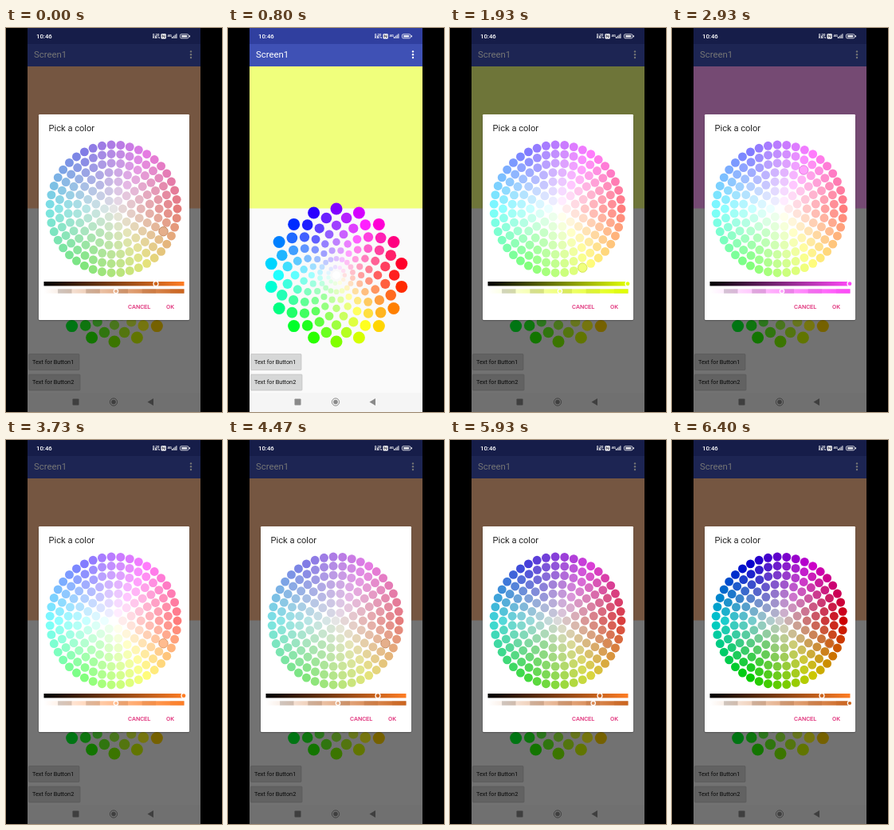
Animation, 271 px wide and 480 px high, one loop 6470 ms. Source, as an HTML page:

```html
<!DOCTYPE html>
<html lang="en">
<head>
<meta charset="utf-8">
<title>Pick a color</title>
<style>
  html, body { margin: 0; width: 100%; height: 100%; overflow: hidden; background: #000; }
  svg { display: block; width: 100vw; height: 100vh; font-family: Roboto, "Open Sans", sans-serif; }
</style>
</head>
<body>
<svg viewBox="0 0 271 480">
  <defs>
    <linearGradient id="valueFill"><stop stop-color="#000"/><stop id="valueEnd" offset="1"/></linearGradient>
    <linearGradient id="alphaFill"><stop id="alphaStart" stop-opacity="0"/><stop id="alphaEnd" offset="1"/></linearGradient>
    <clipPath id="phone"><rect x="27" width="217" height="480"/></clipPath>
  </defs>
  <rect width="271" height="480"/>
  <g clip-path="url(#phone)">
    <rect x="27" width="217" height="480" fill="#fafafa"/>
    <rect x="27" width="217" height="20" fill="#303f9f"/>
    <rect x="27" y="20" width="217" height="28" fill="#3f51b5"/>
    <text x="35" y="37.3" font-size="11.4" fill="#fff">Screen1</text>
    <g fill="#fff">
      <circle cx="232" cy="29.4" r="1.2"/><circle cx="232" cy="33.2" r="1.2"/><circle cx="232" cy="37" r="1.2"/>
    </g>
    <rect id="panel" x="27" y="48" width="217" height="177.5"/>
    <g id="flower"></g>
    <g fill="#d6d7d7" stroke="#bbb" stroke-width=".6">
      <rect x="28.5" y="407.5" width="63.5" height="20" rx="1"/>
      <rect x="28.5" y="433" width="64.5" height="20" rx="1"/>
    </g>
    <rect id="press" x="28.5" y="433" width="64.5" height="20" rx="1" fill="#555"/>
    <g font-size="7.3" fill="#111">
      <text x="33" y="419.7">Text for Button1</text>
      <text x="33" y="445.3">Text for Button2</text>
    </g>
    <rect x="27" y="456" width="217" height="24" fill="#f5f5f5"/>
    <g fill="#8a8a8a">
      <rect x="83.5" y="463.5" width="8" height="8" rx=".8"/>
      <circle cx="135" cy="467.5" r="4.6" fill="none" stroke="#8a8a8a"/>
      <circle cx="135" cy="467.5" r="2.8"/>
      <path d="M185 463v9l-7.5-4.5z"/>
    </g>
    <rect id="dim" x="27" width="217" height="480"/>
    <g fill="#fff">
      <text x="38" y="13" font-size="7.8" font-weight="500">10:46</text>
      <g font-size="4.2" font-weight="700">
        <text x="184" y="9.7">0.20</text><text x="184" y="13.4">KB/s</text>
        <text x="202.5" y="10.5">4G</text>
      </g>
      <rect x="194.5" y="7.2" width="6.3" height="6.3" rx="1"/>
      <path d="M196.3 12v-3.4l2.7 3.4v-3.4" fill="none" stroke="#223" stroke-width=".8"/>
      <path d="M208 13v-2h1v2zm1.8 0v-3.3h1V13zm1.8 0V8.6h1V13zm1.8 0V7.3h1V13z"/>
      <rect x="218.5" y="7.8" width="10.5" height="5" rx="1.4" fill="none" stroke="#fff" stroke-width=".8"/>
      <rect x="220.2" y="9.2" width="7" height="2.2"/><rect x="229.8" y="9.3" width="1.2" height="2"/>
    </g>
    <g id="dialog">
      <rect x="40.4" y="108.8" width="190" height="257.4" rx="2" opacity=".22"/>
      <rect x="41" y="108" width="189" height="257" rx="1.3" fill="#fff"/>
      <text x="53.5" y="129" font-size="11.1" fill="#222">Pick a color</text>
      <g id="wheel"></g>
      <circle id="mark" r="5.7" fill="none" stroke-width=".9"/>
      <rect x="47.5" y="317" width="176" height="5.4" fill="url(#valueFill)"/>
      <g id="checks"></g>
      <rect x="47.5" y="326.3" width="176" height="5.4" fill="url(#alphaFill)"/>
      <circle id="valueKnob" cy="319.7" r="3" stroke="#fff" stroke-width="1.2"/>
      <circle id="alphaKnob" cy="329" r="2.7" stroke="#fff" stroke-width="1.2"/>
      <g font-size="7.5" font-weight="500" fill="#e0307a">
        <text x="153" y="351.2">CANCEL</text><text x="201" y="351.2">OK</text>
      </g>
    </g>
  </g>
</svg>
<script>
const LOOP = 6470, HALF = 0.514, TAU = Math.PI * 2;
const $ = id => document.getElementById(id);
const ramp = (t, a, b) => Math.min(1, Math.max(0, (t - a) / (b - a)));
const mix = (a, b, p) => a + (b - a) * p;
const ease = p => p * p * (3 - 2 * p);

function set(el, attrs) {
  for (const key in attrs) el.setAttribute(key, attrs[key]);
  return el;
}

function add(parent, name, attrs) {
  const el = document.createElementNS("http://www.w3.org/2000/svg", name);
  parent.append(set(el, attrs));
  return el;
}

// HSV colour with alpha, flattened onto a grey level
function color(h, s, v, alpha = 1, ground = 255) {
  const channel = n => {
    const k = (n + h / 60) % 6;
    const c = 255 * v * (1 - s * Math.max(0, Math.min(k, 4 - k, 1)));
    return Math.round(mix(ground, c, alpha));
  };
  return `rgb(${channel(5)},${channel(3)},${channel(1)})`;
}

// Concentric rings; a non-zero jitter makes outer dots larger
function makeWheel(parent, cx, cy, maxRadius, rings, jitter, gap) {
  const dots = [], base = maxRadius / (rings - 1) / 2;
  for (let i = 0; i < rings; i++) {
    const sat = i / (rings - 1), radius = maxRadius * sat;
    const size = base + (i ? base * jitter * (i - rings / 2) / rings : 0);
    let total = Math.max(1, Math.floor(0.975 * Math.PI / Math.asin(size / radius) + 0.5) || 1);
    if (jitter) total = Math.min(total, rings * 2);
    for (let j = 0; j < total; j++) {
      const a = TAU * j / total + Math.PI / total * ((i + 1) % 2);
      const x = cx + radius * Math.cos(a), y = cy + radius * Math.sin(a);
      const hue = a / TAU * 360;
      const el = add(parent, "circle", { cx: x, cy: y, r: size - gap, fill: color(hue, sat, 1) });
      dots.push({ x, y, hue, sat, el });
    }
  }
  return dots;
}

makeWheel($("flower"), 136, 309, 83, 9, 1.2, 0.1);
const dots = makeWheel($("wheel"), 135, 226, 80, 8, 0, 0.25);
for (let i = 0; i < 10; i++) {
  add($("checks"), "rect", { x: 47.5 + i * 17.6, y: 326.3, width: 17.6, height: 5.4, fill: i % 2 ? "#d0d0d0" : "#fff" });
}

function nearest(angle, radius) {
  const a = angle / 360 * TAU;
  const x = 135 + radius * Math.cos(a), y = 226 + radius * Math.sin(a);
  const dist = d => Math.hypot(d.x - x, d.y - y);
  return dots.reduce((best, d) => dist(d) < dist(best) ? d : best);
}

function picked(t) {
  if (t < 70) return nearest(384.3, 68.6);
  if (t < 2400) return nearest(67, 80);
  const p = ease(ramp(t, 3200, 3800));
  return nearest(mix(302, 384.3, p), mix(57.1, 68.6, p));
}

function draw(t) {
  const intro = t < 70;
  const open = intro ? 1 : ramp(t, 1180, 1420);
  const value = intro ? 0.8 : mix(1, 0.8, ease(ramp(t, 4070, 4400)));
  const alpha = intro ? HALF : mix(HALF, 1, ease(ramp(t, 5600, 6270)));
  const { hue, sat, x, y } = picked(t);
  const solid = color(hue, sat, value);

  set($("panel"), { fill: color(hue, sat, 1, HALF) });
  set($("dim"), { opacity: 0.54 * open });
  set($("dialog"), { opacity: open });
  set($("press"), { opacity: 0.4 * ramp(t, 1050, 1180) * (1 - ramp(t, 1400, 1700)) });

  for (const d of dots) set(d.el, { fill: color(d.hue, d.sat, value, alpha) });
  set($("mark"), { cx: x, cy: y, stroke: color(hue, sat, value * 0.85, 0.8) });

  set($("valueEnd"), { "stop-color": color(hue, sat, 1) });
  set($("alphaStart"), { "stop-color": solid });
  set($("alphaEnd"), { "stop-color": solid });
  set($("valueKnob"), { cx: 48 + 175 * value, fill: solid });
  set($("alphaKnob"), { cx: 48 + 175 * alpha, fill: color(hue, sat, value, alpha) });
}

const start = performance.now();
function tick() {
  draw((performance.now() - start) % LOOP);
  requestAnimationFrame(tick);
}
tick();
</script>
</body>
</html>
```
